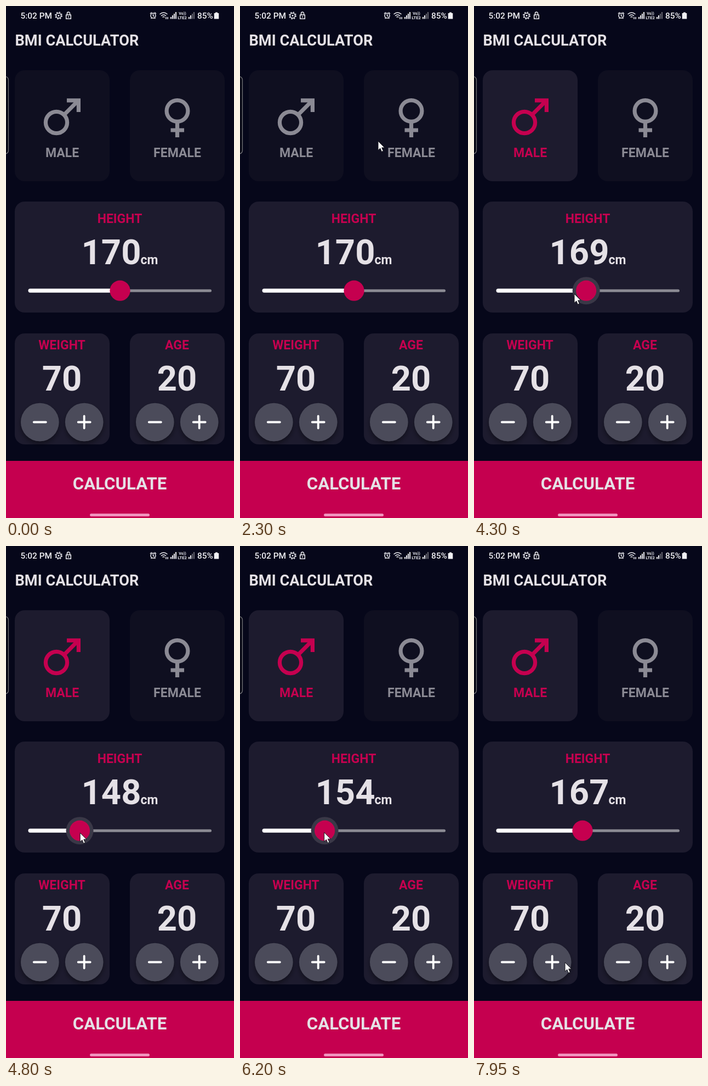
These frames come from a looping animation (416x932 px, 8 s). An HTML page:

```html
<!DOCTYPE html>
<html lang="en">
<head>
<meta charset="utf-8">
<title>BMI Calculator</title>
<style>
html, body { margin: 0; width: 100%; height: 100%; overflow: hidden; background: #06071a; }
svg { display: block; width: 416px; height: 932px; font-family: Roboto, "Noto Sans", sans-serif; font-weight: 700; }
.card { fill: #1d1b2e; }
.idle { fill: #0f0f20; }
.pink { fill: #c5004f; }
.light { fill: #e5e1e6; }
.mid { text-anchor: middle; }
.label { font-size: 23px; }
.number { font-size: 63.3px; }
.status { font-size: 15.4px; font-weight: 500; fill: #f0f0f3; }
.line { fill: none; stroke: #eeeef2; stroke-width: 1.5; }
#male, #female { fill: none; stroke-width: 7.2; }
#female, #male { stroke: #8b8a94; }
#male text, #female text { fill: #8b8a94; stroke: none; }
#male.on { stroke: #c5004f; }
#male.on text { fill: #c5004f; }
#male .card, #female .card { stroke: none; fill: #0f0f20; }
#male.on .card { fill: #1d1b2e; }
</style>
</head>
<body>
<svg viewBox="0 0 416 932">
  <defs>
    <filter id="shadow" x="-30%" y="-30%" width="160%" height="170%">
      <feDropShadow dx="0" dy="5" stdDeviation="4" flood-color="#000" flood-opacity=".4"/>
    </filter>
  </defs>
  <rect width="416" height="932" fill="#06071a"/>

  <g id="statusBar">
    <text class="status" x="26.5" y="23">5:02 PM</text>
    <circle class="line" cx="96" cy="17.5" r="4.6"/>
    <circle class="line" cx="96" cy="17.5" r="6.2" stroke-dasharray="2.4 2.47"/>
    <circle cx="96" cy="17.5" r="1.5" fill="#eeeef2"/>
    <path class="line" d="M109.700 16.200h8.600v7h-8.600zM111.500 16v-2.500a2.500 2.500 0 0 1 5 0V16M114 18.500v2.500"/>
    <circle class="line" cx="268.500" cy="17.500" r="4.500" stroke-width="2"/>
    <path class="line" d="M268.500 14.500v3.200l2 1.500M263 14l3-2.500M274 14l-3-2.500M264.500 23l1.500-1.500M272.500 23l-1.500-1.500"/>
    <path class="line" d="M280.500 15q7-6 14 0M283 18q4.500-4 9 0M285.500 20.500q2-2 4 0M292 20v4M295 20v4"/>
    <g id="bars"></g>
    <text class="mid" x="322" y="16" font-size="7" fill="#eeeef2">Vo))</text>
    <text class="mid" x="321.500" y="24" font-size="7.500" fill="#eeeef2">LTE2</text>
    <text class="status" x="349" y="23">85%</text>
    <path d="M382 11.500h4v1.500h2.300v10.500h-8.600V13h2.300z" fill="#f0f0f3"/>
  </g>

  <text class="light" x="16.500" y="72" font-size="27.200">BMI CALCULATOR</text>

  <g id="male">
    <rect class="card" x="16" y="117" width="173" height="202" rx="18"/>
    <circle cx="92" cy="212" r="19.600"/>
    <path d="M106 198L131 173M111 171.800H132.400V193"/>
    <text class="label mid" x="102.500" y="275">MALE</text>
  </g>
  <g id="female">
    <rect class="card" x="226" y="117" width="173" height="202" rx="18"/>
    <circle cx="312.500" cy="191" r="19.400"/>
    <path d="M312.500 211V239M300.500 226H325"/>
    <text class="label mid" x="312.500" y="275">FEMALE</text>
  </g>
  <rect x="-12" y="128.500" width="16.500" height="140.500" rx="6" fill="#090a17" stroke="#77777b" stroke-width="1.200"/>

  <rect class="card" x="16" y="356" width="383" height="202" rx="18"/>
  <text class="label pink mid" x="207.500" y="395">HEIGHT</text>
  <text id="height" class="number light" x="137.500" y="470"></text>
  <text class="label light" x="245.500" y="469.500">cm</text>
  <rect x="41" y="515.700" width="334" height="5" rx="2.500" fill="#8b8a93"/>
  <rect id="filled" x="40.500" y="514.500" height="7.200" rx="3.600" fill="#fff"/>
  <circle id="halo" cy="518.200" r="25" fill="#3a3847"/>
  <circle id="thumb" class="pink" cy="518.200" r="18.600"/>

  <g id="counters"></g>

  <rect class="pink" y="828" width="416" height="104"/>
  <text class="light mid" x="207.500" y="880" font-size="31.200">CALCULATE</text>
  <rect x="153" y="924" width="109" height="5" rx="2.500" fill="#f094bd"/>
  <path id="cursor" d="M0 0V16.500L3.800 13L6.400 19.200L9.400 18L6.700 11.900H11.800Z" fill="#fff" stroke="#15151c" stroke-width="1"/>
</svg>
<script>
const DURATION = 8000, STEP = 50, SELECT_AT = 2800, LAG = 150;
const PRESS = 4150, RELEASE = 7350;
const TRACK = { left: 41, unit: 3.34, min: 120 };
const $ = id => document.getElementById(id);

// Pointer tip: time, x, y
const path = [
  [1550, 387, 318], [1950, 252, 246], [2350, 252, 246], [2700, 124, 205],
  [3000, 124, 205], [3250, 134, 246], [3450, 134, 246], [4000, 208, 524],
  [4100, 208, 524], [4150, 204.5, 524], [4300, 183, 524], [4650, 136, 523],
  [4850, 135, 522], [5300, 173.500, 520.500], [5700, 174, 520.500], [6100, 154, 521],
  [6350, 153, 522], [6850, 194.500, 522], [7000, 194.500, 522], [7150, 198, 522],
  [7400, 198, 524], [7850, 166, 758], [8000, 166, 758]
];

const lerp = (a, b, k) => a + (b - a) * k;
const clamp = v => Math.max(0, Math.min(1, v));
const ease = k => k * k * (3 - 2 * k);

function pointer(t) {
  const i = Math.max(1, path.findIndex(p => p[0] >= t));
  const a = path[i - 1], b = path[i];
  const k = ease(clamp((t - a[0]) / (b[0] - a[0])));
  return [lerp(a[1], b[1], k), lerp(a[2], b[2], k)];
}

function heightAt(t) {
  const when = Math.min(t, RELEASE) - LAG;
  if (when < PRESS - LAG) return 170;
  return Math.round((pointer(when)[0] - TRACK.left) / TRACK.unit + TRACK.min);
}

function button(x, isPlus) {
  const icon = `M${x - 11} 757.500h22` + (isPlus ? `M${x} 746.500v22` : "");
  return `<circle cx="${x}" cy="757.500" r="34.800" fill="#4b4c5a" filter="url(#shadow)"/>
    <path d="${icon}" stroke="#fff" stroke-width="3.800" stroke-linecap="round"/>`;
}

function counter(x, label, value) {
  const mid = x + 86.500;
  return `<rect class="card" x="${x}" y="596" width="173" height="202" rx="18"/>
    <text class="label pink mid" x="${mid - .500}" y="624.500">${label}</text>
    <text class="number light mid" x="${mid - .500}" y="700">${value}</text>
    ${button(mid - 40.700, false)}${button(mid + 40.200, true)}`;
}

function signal(x, lit) {
  return [0, 1, 2, 3].map(i =>
    `<rect x="${x + i * 3}" y="${20 - i * 3}" width="2" height="${3.500 + i * 3}"
      fill="${i < lit ? "#eeeef2" : "#66666f"}"/>`).join("");
}

$("counters").innerHTML = counter(16, "WEIGHT", 70) + counter(226, "AGE", 20);
$("bars").innerHTML = signal(300, 4) + signal(333, 2);

function draw(t) {
  const value = heightAt(t);
  const x = TRACK.left + (value - TRACK.min) * TRACK.unit;
  const [px, py] = pointer(t);
  const haloSize = clamp((t - PRESS) / 100) * clamp((RELEASE + 100 - t) / 100);

  $("male").classList.toggle("on", t >= SELECT_AT);
  $("height").textContent = value;
  $("filled").setAttribute("width", x - 40.500);
  $("thumb").setAttribute("cx", x);
  $("halo").setAttribute("cx", x);
  $("halo").setAttribute("r", 25 * haloSize);
  $("cursor").setAttribute("transform", `translate(${px} ${py})`);
  $("cursor").setAttribute("visibility", t < path[0][0] ? "hidden" : "visible");
}

const start = performance.now();
function frame() {
  const t = (performance.now() - start) % DURATION;
  draw(Math.floor(t / STEP) * STEP);
  requestAnimationFrame(frame);
}
frame();
</script>
</body>
</html>
```
